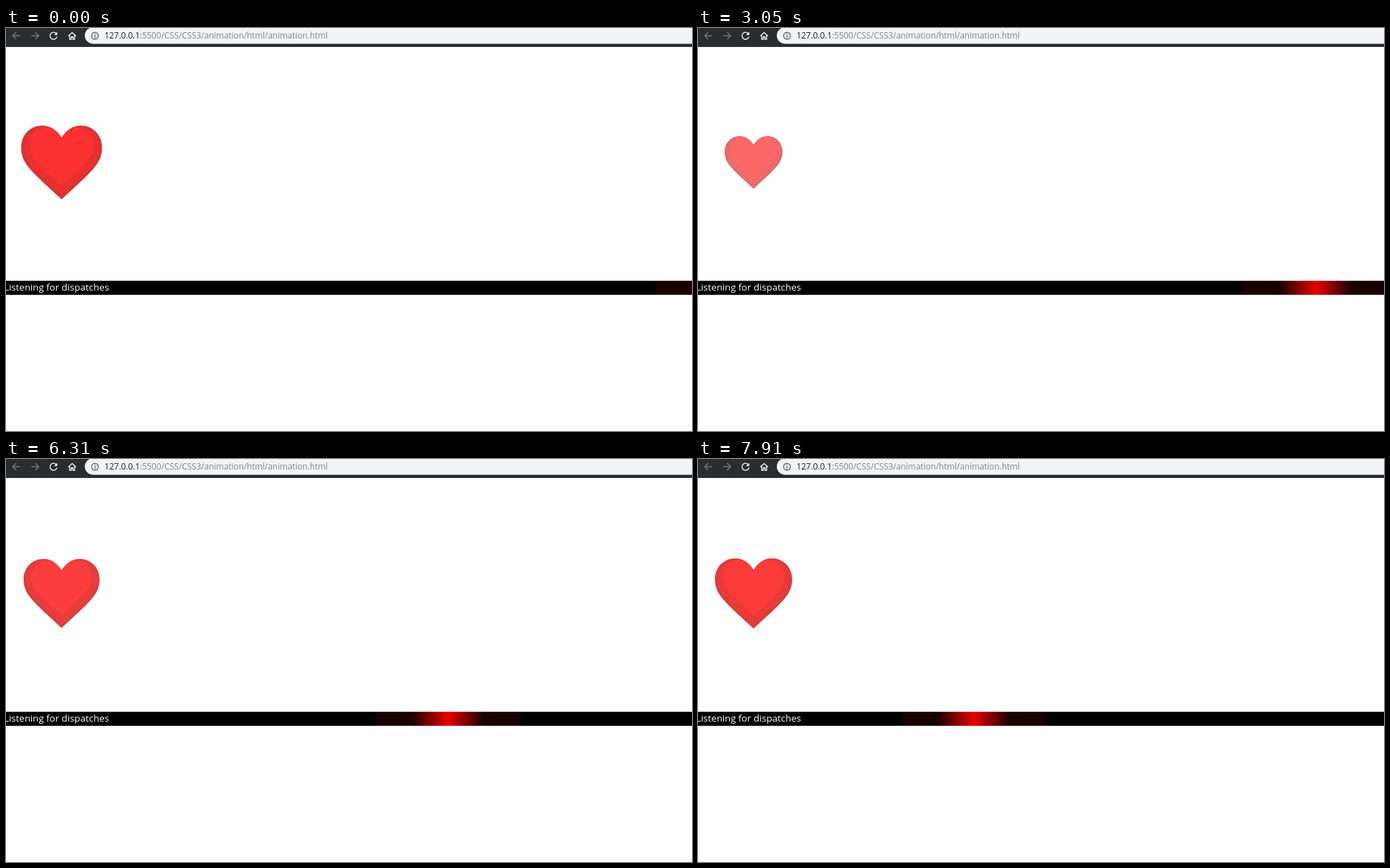
An HTML page that plays this animation: 975 px wide and 574 px high, repeating every 8000 ms.

```html
<!DOCTYPE html>
<html lang="en">
<head>
<meta charset="utf-8">
<title>Heartbeat and scanner</title>
<style>
  html, body { margin: 0; width: 100%; height: 100%; overflow: hidden; background: #fefefe; }
  svg { display: block; }
  text { font-family: "Open Sans", "Noto Sans", sans-serif; }
  .icon { fill: none; stroke-width: 1.4; }
</style>
</head>
<body>
<svg width="975" height="574" viewBox="0 0 975 574">
  <defs>
    <linearGradient id="glow">
      <stop offset=".25" stop-color="#f00" stop-opacity=".1"/>
      <stop offset=".5" stop-color="#f00" stop-opacity=".9"/>
      <stop offset=".75" stop-color="#f00" stop-opacity=".1"/>
    </linearGradient>
    <path id="shape" d="M0-41C-8-54-19-61.5-32-61.5C-52-61.5-67.5-46-67.5-25C-67.5 2-50 15 0 61.5C50 15 67.5 2 67.5-25C67.5-46 52-61.5 32-61.5C19-61.5 8-54 0-41Z"/>
    <clipPath id="outline"><use href="#shape"/></clipPath>
    <filter id="soft"><feGaussianBlur stdDeviation="1.5"/></filter>
  </defs>

  <!-- Browser bar -->
  <rect width="975" height="27" fill="#2b2c2e"/>
  <rect x="112" y="-1" width="900" height="23.5" rx="11.75" fill="#f1f3f4"/>
  <g class="icon" stroke="#77797c">
    <path d="M20 11H9.5M14.5 6L9.5 11L14.5 16"/>
    <path d="M36 11H46.500M41.500 6L46.500 11L41.500 16"/>
  </g>
  <g class="icon" stroke="#f1f3f4">
    <path d="M71.300 7.800A5 5 0 1 0 72.400 12.300"/>
    <path d="M72.800 5.500V10H68.300Z" fill="#f1f3f4" stroke="none"/>
    <path d="M88.500 11.500L94 6.500L99.500 11.500M90.500 10.500V16H92.800V12.500H95.200V16H97.500V10.500"/>
  </g>
  <g class="icon" stroke="#5f6368" stroke-width="1.2">
    <circle cx="126.500" cy="11" r="4.800"/>
    <path d="M126.500 10.300V13.800M126.500 8V9.300"/>
  </g>
  <text x="140" y="15" font-size="11.9" fill="#202124">127.0.0.1<tspan fill="#80868b">:5500/CSS/CSS3/animation/html/animation.html</tspan></text>

  <g id="heart">
    <use href="#shape" fill="#d01213"/>
    <g clip-path="url(#outline)">
      <use href="#shape" transform="translate(0 -2) scale(.93)" fill="#e30d0d" filter="url(#soft)"/>
      <use href="#shape" transform="translate(0 -9) scale(.8)" fill="#fb0a0a" filter="url(#soft)"/>
    </g>
  </g>

  <rect y="360" width="975" height="20"/>
  <rect id="scanner" y="360" width="205" height="20" fill="url(#glow)"/>
  <text x="-2.8" y="374" font-size="13.5" fill="#fff">Listening for dispatches</text>
</svg>
<script>
  const LOOP = 8000;
  const heart = document.getElementById('heart');
  const scanner = document.getElementById('scanner');

  // The motion advances in steps: regular, then ever slower, then regular again.
  const slowSteps = [710, 990, 1410, 2080, 3050, 4380];

  // Scanner centre as [step, x]
  const track = [[0, 1026], [6, 930], [12, 868], [13, 855], [15, 827], [29, 628], [38, 490], [45, 392]];

  function stepAt(t) {
    if (t < 710) return Math.min(6, Math.floor((t + 70) / 100));
    if (t < 4710) return 6 + slowSteps.filter(s => s <= t).length;
    return 13 + Math.floor((t - 4710) / 100);
  }

  function centreAt(step) {
    const i = Math.max(1, track.findIndex(([n]) => n >= step));
    const [n0, x0] = track[i - 1], [n1, x1] = track[i];
    return x0 + (x1 - x0) * (step - n0) / (n1 - n0);
  }

  function draw(t) {
    const x = centreAt(stepAt(t));
    // The heart swings linearly between half and full size, fading with its scale.
    const scale = 1 - Math.abs(305 - Math.abs(x - 811)) / 610;
    scanner.setAttribute('x', x - 102.5);
    heart.setAttribute('transform', `translate(79 191.5) scale(${scale})`);
    heart.setAttribute('opacity', scale);
  }

  const start = performance.now();
  function frame() {
    draw((performance.now() - start) % LOOP);
    requestAnimationFrame(frame);
  }
  frame();
</script>
</body>
</html>
```
